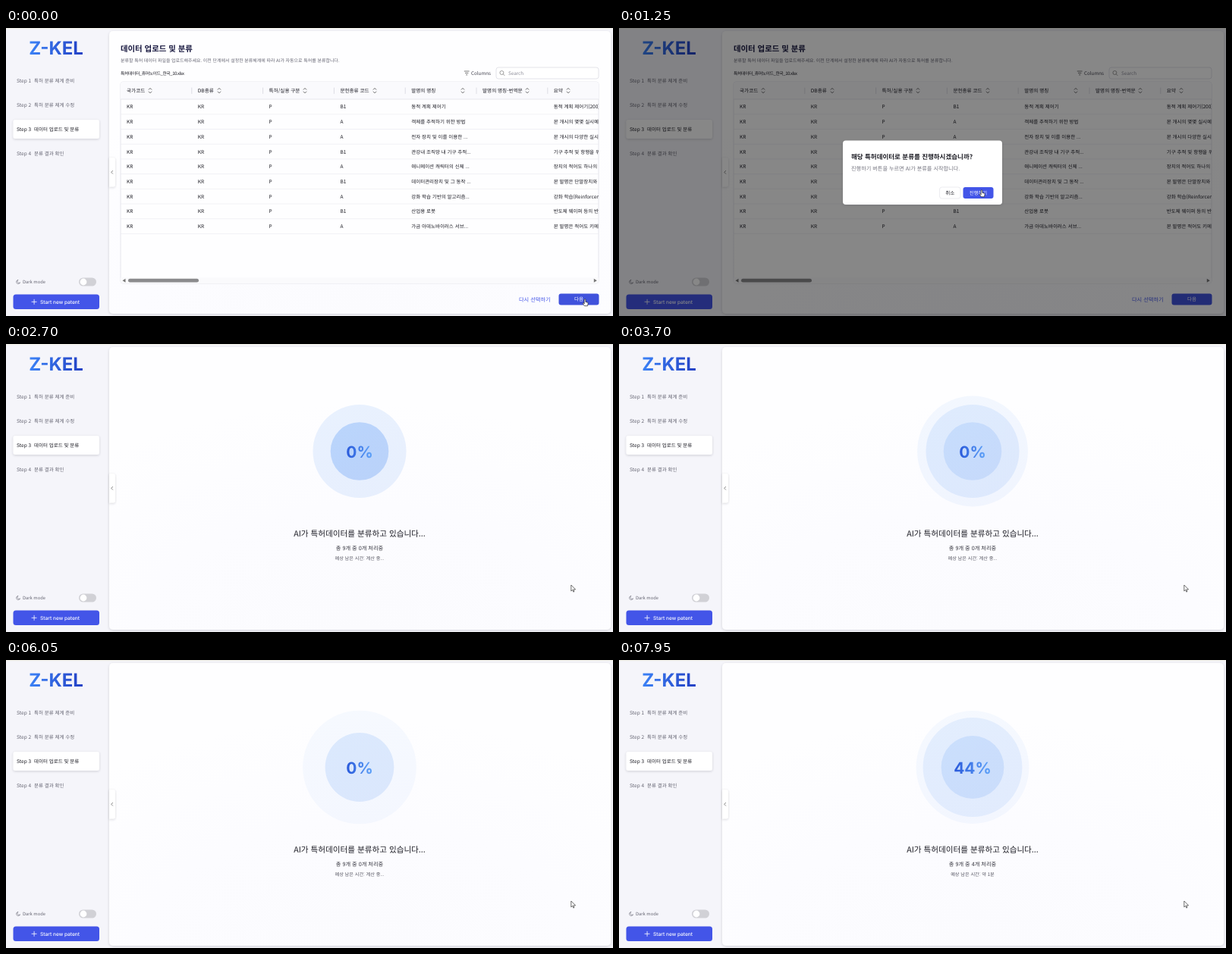
Animation of 800 by 380 pixels, one loop 8000 ms. Source, as an HTML page:

```html
<!DOCTYPE html>
<html lang="ko">
<head>
<meta charset="utf-8">
<title>특허 분류</title>
<style>
  html, body { margin: 0; width: 100%; height: 100%; overflow: hidden; background: #f5f5fa; }
  svg { display: block; width: 800px; height: 380px; }
  text { font-family: "Noto Sans CJK KR", "Noto Sans CJK", "Noto Sans", sans-serif; text-rendering: geometricPrecision; white-space: pre; }
  .latin { font-family: Inter, sans-serif; }
</style>
</head>
<body>
<svg id="stage" viewBox="0 0 800 380" xmlns="http://www.w3.org/2000/svg"></svg>
<script>
const LOOP = 8000, DIALOG_OPEN = 300, DIALOG_CLOSE = 1330, LOADING = 1520, RESULT = 7000;
const BLUE = '#4355e8', INK = '#1c1c24', MUTED = '#666673';

const text = (x, y, content, size, { fill = INK, weight = 400, anchor = 'start', cls = '', id = '', spacing = 0 } = {}) =>
  `<text x="${x}" y="${y}" font-size="${size}" fill="${fill}" font-weight="${weight}" text-anchor="${anchor}"
    letter-spacing="${spacing}" class="${cls}" ${id && `id="${id}"`}>${content}</text>`;
const rect = (x, y, w, h, r, fill, extra = '') =>
  `<rect x="${x}" y="${y}" width="${w}" height="${h}" rx="${r}" fill="${fill}" ${extra}/>`;
const line = (d, stroke, width = 0.7, extra = '') =>
  `<path d="${d}" fill="none" stroke="${stroke}" stroke-width="${width}" stroke-linecap="round" stroke-linejoin="round" ${extra}/>`;

const defs = `<defs>
  <linearGradient id="brand"><stop stop-color="#3b82f6"/><stop offset="1" stop-color="#2340c4"/></linearGradient>
  <linearGradient id="percentFill"><stop stop-color="#2858da"/><stop offset="1" stop-color="#60a5fa"/></linearGradient>
  <linearGradient id="ringFill" x2="1" y2="1"><stop stop-color="#5b9df8"/><stop offset="1" stop-color="#5c95f2"/></linearGradient>
  <radialGradient id="panelFill" cx=".5" cy="1" r=".8"><stop stop-color="#fbfbfe"/><stop offset=".55" stop-color="#fcfcff"/><stop offset="1" stop-color="#fefeff"/></radialGradient>
  <filter id="shadow" x="-20%" y="-30%" width="140%" height="160%"><feDropShadow dx="0" dy="1" stdDeviation="1.5" flood-color="#333348" flood-opacity=".2"/></filter>
  <clipPath id="tableClip"><rect x="151" y="71" width="630" height="266" rx="3"/></clipPath>
</defs>`;

function sidebar() {
  const steps = ['특허 분류 체계 준비', '특허 분류 체계 수정', '데이터 업로드 및 분류', '분류 결과 확인'];
  const items = steps.map((label, i) => {
    const y = 72 + i * 32, fill = i === 2 ? INK : MUTED;
    return text(14, y, `Step ${i + 1}`, 6.5, { fill }) + text(37, y, label, 6.5, { fill });
  }).join('');
  return text(66, 35, 'Z-KEL', 24, { fill: 'url(#brand)', weight: 700, anchor: 'middle', cls: 'latin' })
    + rect(9.5, 121, 113.5, 25, 3, '#fff', 'filter="url(#shadow)"') + items
    + line('M15.6 332.4a2.6 2.6 0 1 0 3 3.4a2.2 2.2 0 0 1 -3 -3.4z', MUTED, 0.6)
    + text(22, 337.2, 'Dark mode', 5.8, { fill: MUTED })
    + rect(96, 329.5, 23, 11, 5.5, '#d1d1d6') + '<circle cx="102" cy="335" r="4.4" fill="#fff"/>'
    + rect(9.5, 351.5, 113.5, 19.5, 3.5, BLUE)
    + line('M34 361.3h6.2M37.1 358.2v6.2', '#fff', 0.8)
    + text(45, 363.6, 'Start new patent', 6.6, { fill: '#fff', weight: 500, cls: 'latin' });
}

function table() {
  const columns = [
    ['국가코드', 190], ['DB종류', 281], ['특허/실용 구분', 394], ['문헌종류 코드', 486],
    ['발명의 명칭', 602], ['발명의 명칭-번역문', 687], ['요약', 741]];
  const rows = [
    ['B1', '동적 계획 제어기', '동적 계획 제어기(200)'],
    ['A', '객체를 추적하기 위한 방법', '본 개시의 몇몇 실시예에'],
    ['A', '전자 장치 및 이를 이용한 ...', '본 개시의 다양한 실시예'],
    ['B1', '관강내 조직망 내 기구 추적...', '기구 추적 및 항행을 위한'],
    ['A', '애니메이션 캐릭터의 신체 ...', '장치의 적어도 하나의'],
    ['B1', '데이터관리장치 및 그 동작 ...', '본 발명은 단말장치와'],
    ['A', '강화 학습 기반의 알고리즘...', '강화 학습(Reinforcement'],
    ['B1', '산업용 로봇', '반도체 웨이퍼 등의 반송'],
    ['A', '가금 아데노바이러스 서브...', '본 발명은 적어도 키메라']];
  const columnX = i => 159 + i * 93.8;
  const header = columns.map(([label, sortX], i) =>
    text(columnX(i), 84.8, label, 6.6, { weight: 500 })
    + line(`M${sortX - 1.8} 81.2l1.8 -1.8l1.8 1.8M${sortX - 1.8} 84l1.8 1.8l1.8 -1.8`, '#444', 0.8)
    + (i ? line(`M${columnX(i) - 8} 79v7.5`, '#d2d2da') : '')).join('');
  const body = rows.map(([kind, title, summary], r) => {
    const y = 106.4 + r * 19.7;
    return ['KR', 'KR', 'P', kind, title, '', summary].map((cell, i) => text(columnX(i), y, cell, 6.5)).join('')
      + line(`M151 ${113.8 + r * 19.7}H781`, '#e8e8ee', 0.6);
  }).join('');
  return rect(151, 71, 630, 266, 3, '#fefeff', 'stroke="#e0e0e8" stroke-width=".8"')
    + `<g clip-path="url(#tableClip)">${rect(151, 71, 630, 23, 0, '#fafafd')}${header}${line('M151 94H781', '#dedee6')}${body}
      ${rect(151, 329.5, 630, 7.5, 0, '#fafafc')}${rect(161, 330.8, 93, 4.8, 2.4, '#8b8b8d')}
      <path d="M157.5 330.8v5l-4 -2.5zM774.8 330.8v5l4 -2.5z" fill="#777"/></g>`;
}

function uploadPage() {
  return text(151, 31, '데이터 업로드 및 분류', 10.4, { weight: 700, fill: '#17173f' })
    + text(151, 45.4, '분류할 특허 데이터 파일을 업로드해주세요. 이전 단계에서 설정한 분류체계에 따라 AI가 자동으로 특허를 분류합니다.', 5.97, { fill: MUTED })
    + text(151, 61.8, '특허데이터_휴머노이드_한국_10.xlsx', 5.9, { weight: 500, spacing: -0.45 })
    + line('M604.2 57h6M605.4 59.4h3.6M606.5 61.8h1.4', '#555', 0.8)
    + text(613, 61.8, 'Columns', 6.3, { fill: '#444450' })
    + rect(646, 52, 135, 15, 3, '#fff', 'stroke="#dcdce4" stroke-width=".8"')
    + '<circle cx="653.4" cy="59" r="2.5" fill="none" stroke="#777" stroke-width=".7"/>' + line('M655.3 60.9l1.8 1.8', '#777')
    + text(662, 61.8, 'Search', 6.3, { fill: '#8c8c98' })
    + table()
    + text(676, 360.6, '다시 선택하기', 7.2, { fill: BLUE })
    + rect(728.5, 350.5, 53, 15, 3, '#4052dc')
    + text(755, 360.4, '다음', 6.6, { fill: '#fff', weight: 500, anchor: 'middle' });
}

function loadingPage() {
  const centered = (y, content, size, options) => text(466, y, content, size, { anchor: 'middle', ...options });
  return '<circle class="ring" cx="466" cy="141.5" r="38" fill="url(#ringFill)"/>'.repeat(3)
    + centered(149.8, '0%', 21, { id: 'percent', fill: 'url(#percentFill)', weight: 700, cls: 'latin' })
    + centered(254, 'AI가 특허데이터를 분류하고 있습니다...', 10.6, { weight: 500 })
    + centered(271.7, '', 7.2, { id: 'count', fill: '#33333c' })
    + centered(285.4, '', 6.2, { id: 'remaining', fill: '#555560' });
}

function dialog() {
  return rect(295, 148.5, 210, 84.5, 4, '#fff', 'filter="url(#shadow)"')
    + text(306, 173, '해당 특허데이터로 분류를 진행하시겠습니까?', 8.5, { weight: 700 })
    + text(306, 188, '진행하기 버튼을 누르면 AI가 분류를 시작합니다.', 7.15, { fill: '#73737e' })
    + rect(422.5, 210, 27.5, 15, 3, '#fff', 'stroke="#e4e4ea" stroke-width=".7"')
    + text(436.2, 219.9, '취소', 6.5, { weight: 500, anchor: 'middle' })
    + rect(453.5, 210, 40, 15, 3, BLUE)
    + text(473.5, 219.9, '진행하기', 6.4, { fill: '#fff', weight: 500, anchor: 'middle' });
}

const stage = document.getElementById('stage');
stage.innerHTML = defs
  + rect(0, 0, 800, 380, 0, '#f5f5fa') + rect(0, 0, 800, 1.3, 0, '#efeee6')
  + sidebar()
  + rect(136, 4, 661, 373, 5, 'url(#panelFill)', 'filter="url(#shadow)"')
  + `<g id="upload">${uploadPage()}</g><g id="loading">${loadingPage()}</g>`
  + '<path d="M136 171h5a3 3 0 0 1 3 3v32.5a3 3 0 0 1 -3 3h-5z" fill="#fff" filter="url(#shadow)"/>'
  + line('M140.6 188.4l-1.8 1.9l1.8 1.9', '#555')
  + `<g id="modal"><rect width="800" height="380" fill="#000" opacity=".47"/>${dialog()}</g>`
  + line('M0 0v7.6l1.8 -1.6l1.2 2.7l1.2 -.5l-1.2 -2.7h2.4z', '#333', 0.7, 'id="arrow" style="fill:#fff"')
  + line('M-.9 5.3V.6a.9 .9 0 0 1 1.8 0V3.4l2.4 .7q1 .3 .8 1.4l-.6 3.2h-4l-2.4 -3.2q.5 -1.3 2 -.2z', '#222', 0.7, 'id="hand" style="fill:#fff"');

const el = Object.fromEntries([...stage.querySelectorAll('[id]')].map(node => [node.id, node]));
const rings = [...stage.querySelectorAll('.ring')];

const clamp = v => Math.min(1, Math.max(0, v));
const progress = (t, from, to) => clamp((t - from) / (to - from));
const smooth = p => p * p * (3 - 2 * p);
const show = (node, visible) => node.setAttribute('display', visible ? 'inline' : 'none');

// cubic-bezier(0, 0, .2, 1), solved by bisection
function easeOut(x) {
  let low = 0, high = 1;
  for (let i = 0; i < 20; i++) {
    const s = (low + high) / 2;
    if (0.6 * (1 - s) * s * s + s ** 3 < x) low = s; else high = s;
  }
  return 3 * (1 - low) * low * low + low ** 3;
}

function drawRings(t) {
  // the pulse stalls briefly just after the page appears
  const clock = t < 1700 ? t - 1540 : Math.max(160, t - 1890);
  rings.forEach((ring, i) => {
    const age = Math.max(0, clock - i * 1000);
    const p = clamp(age % 4000 / 3000);
    ring.setAttribute('r', 38.3 * (1 + easeOut(p)));
    ring.setAttribute('opacity', 0.18 * (1 - p));
  });
}

function drawCursor(t) {
  const path = [[0, 763, 358], [450, 763, 358], [1050, 478, 214], [1380, 478, 214], [1680, 740.8, 319.8], [1850, 740.8, 319.8], [2200, 744.8, 318.4], [LOOP, 744.8, 318.4]];
  const next = path.findIndex(point => t < point[0]);
  const [t0, x0, y0] = path[next - 1], [t1, x1, y1] = path[next];
  const p = smooth(progress(t, t0, t1));
  const pointing = t < 500 || (t > 980 && t < 1420);
  const place = `translate(${x0 + (x1 - x0) * p} ${y0 + (y1 - y0) * p})`;
  for (const node of [el.hand, el.arrow]) node.setAttribute('transform', place);
  show(el.hand, pointing);
  show(el.arrow, !pointing);
}

function draw(t) {
  const loading = t >= LOADING, done = t >= RESULT;
  show(el.upload, !loading);
  show(el.loading, loading);
  el.modal.setAttribute('opacity', progress(t, DIALOG_OPEN, DIALOG_OPEN + 200) * (1 - progress(t, DIALOG_CLOSE, DIALOG_CLOSE + 180)));
  el.percent.textContent = done ? '44%' : '0%';
  el.count.textContent = `총 9개 중 ${done ? 4 : 0}개 처리중`;
  el.remaining.textContent = `예상 남은 시간: ${done ? '약 1분' : '계산 중...'}`;
  drawRings(t);
  drawCursor(t);
}

const start = performance.now();
function tick() {
  draw((performance.now() - start) % LOOP);
  requestAnimationFrame(tick);
}
tick();
</script>
</body>
</html>
```
